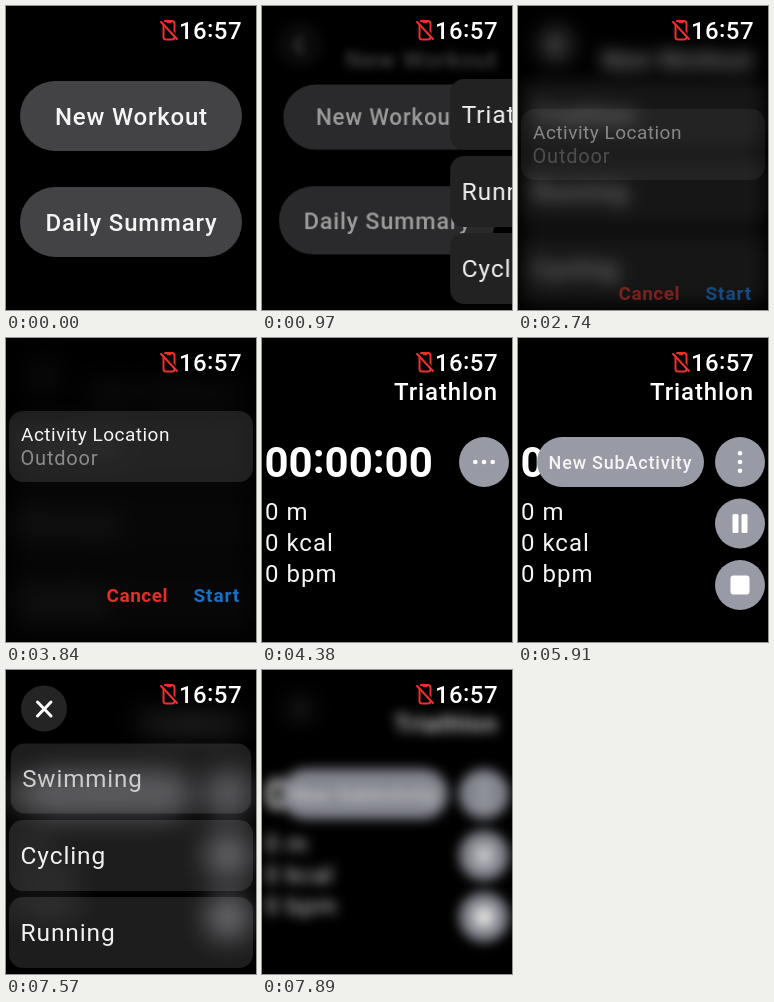
These frames come from a looping animation (250 px wide and 304 px high, 8 s). An HTML page with a canvas:

```html
<!DOCTYPE html>
<html lang="en">
<head>
<meta charset="utf-8">
<title>Workout watch app</title>
<style>
  html, body { margin: 0; width: 100%; height: 100%; overflow: hidden; background: #000; }
  canvas { display: block; width: 250px; height: 304px; }
</style>
</head>
<body>
<canvas id="stage" width="250" height="304"></canvas>
<script>
const W = 250, H = 304, LOOP = 8000;
const stage = document.getElementById('stage').getContext('2d');
const buffer = document.createElement('canvas');
buffer.width = W;
buffer.height = H;
const paint = buffer.getContext('2d');
let g = stage;

const clamp = v => Math.max(0, Math.min(1, v));
const lerp = (a, b, p) => a + (b - a) * p;
const smooth = p => p * p * (3 - 2 * p);
const easeOut = p => 1 - (1 - p) ** 3;

// Progress in n hard steps: the first lands at start, the last at end.
function stepped(t, start, end, n) {
  if (t < start) return 0;
  if (t >= end) return 1;
  return (Math.floor((t - start) / (end - start) * (n - 1) + 0.03) + 1) / n;
}
// Same steps, but the first one still holds the old pose.
const held = (t, start, end, n) => clamp((stepped(t, start, end, n) * n - 1) / (n - 1));

function box(x, y, w, h, r, fill) {
  g.fillStyle = fill;
  g.beginPath();
  g.roundRect(x, y, w, h, r);
  g.fill();
}
function disc(x, y, r, fill) {
  g.fillStyle = fill;
  g.beginPath();
  g.arc(x, y, r, 0, Math.PI * 2);
  g.fill();
}
function line(points, color, width) {
  g.strokeStyle = color;
  g.lineWidth = width;
  g.lineCap = g.lineJoin = 'round';
  g.beginPath();
  points.forEach(([x, y], i) => i ? g.lineTo(x, y) : g.moveTo(x, y));
  g.stroke();
}
function setFont(size, weight, gap) {
  g.font = `${weight} ${size}px Roboto, sans-serif`;
  g.letterSpacing = gap + 'px';
}
function text(str, x, y, { size = 24, weight = 400, gap = 0.9, color = '#f5f5f5', align = 'left' } = {}) {
  setFont(size, weight, gap);
  g.fillStyle = color;
  g.textAlign = align;
  const trail = { left: 0, center: gap / 2, right: gap }[align];
  g.fillText(str, x + trail, y);
}
// Digits with colons raised to their middle.
function clock(str, x, y, size, weight, gap) {
  setFont(size, weight, gap);
  g.fillStyle = '#fff';
  g.textAlign = 'left';
  for (const ch of str) {
    g.fillText(ch, x, ch === ':' ? y - size * 0.09 : y);
    x += g.measureText(ch).width;
  }
}
function scaled(x, y, s, draw) {
  g.save();
  g.translate(x, y);
  g.scale(s, s);
  g.translate(-x, -y);
  draw();
  g.restore();
}

function layer(draw, { blur = 0, alpha = 1, dx = 0, dy = 0, scale = 1 } = {}) {
  if (alpha <= 0) return;
  paint.clearRect(0, 0, W, H);
  g = paint;
  draw();
  g = stage;
  g.save();
  g.globalAlpha = clamp(alpha);
  if (blur > 0.05) g.filter = `blur(${blur}px)`;
  g.translate(W / 2 + dx, H / 2 + dy);
  g.scale(scale, scale);
  g.drawImage(buffer, -W / 2, -H / 2);
  g.restore();
}
// A screen lying behind a sheet; q = 1 when fully covered.
function behind(draw, q, dim, alpha = 1) {
  layer(draw, { blur: 13 * q, alpha: alpha * (1 - dim * q * q) });
}

function status() {
  const red = '#ee3028';
  g.strokeStyle = red;
  g.lineWidth = 2;
  g.beginPath();
  g.roundRect(157.5, 15, 11, 18.5, 2.5);
  g.stroke();
  line([[161.5, 16.5], [164.5, 16.5]], red, 1.5);
  line([[156.5, 15.2], [172, 31.8]], '#000', 2);
  line([[155, 16], [171, 33]], red, 2);
  clock('16:57', 173, 33, 24, 500, 0.4);
}

const title = (str, gap) => text(str, 235, 62, { weight: 500, gap, align: 'right', color: '#fff' });

function home(press) {
  ['New Workout', 'Daily Summary'].forEach((label, i) => {
    const y = 75 + i * 106;
    scaled(125, y + 35, i ? 1 : 1 - 0.04 * press, () => {
      box(14, y, 222, 70, 35, '#434346');
      text(label, 125, y + 43.5, { weight: 500, gap: 0.8, align: 'center' });
    });
  });
}

function rows(names, fill, press = 0) {
  names.forEach((name, i) => {
    const y = 73 + i * 77;
    scaled(125, y + 36, i ? 1 : 1 - 0.015 * press, () => {
      box(3, y, 244, 71, 14, fill);
      const shade = i ? 240 : 240 - 35 * press;
      text(name, 14.5, y + 44, { size: 24.5, color: `rgb(${shade},${shade},${shade})` });
    });
  });
}
const sports = press => rows(['Triathlon', 'Running', 'Cycling'], '#222223', press);
function sportsHeader() {
  disc(38, 38.5, 23, '#242425');
  line([[40.5, 31], [33, 39], [40.5, 47]], '#fff', 3.4);
  title('New Workout', 0.7);
}

const GLASS = 'rgba(255,255,255,0.115)';
function locationSheet(press) {
  box(3, 73, 244, 71, 14, GLASS);
  text('Activity Location', 15, 102.5, { size: 19, gap: 0.5 });
  text('Outdoor', 14.5, 127, { size: 20, gap: 0.8, color: '#8b8b8e' });
  text('Cancel', 100.5, 264, { size: 19, weight: 600, gap: 0.5, color: '#e22f28' });
  text('Start', 187.5, 264, { size: 19, weight: 600, gap: 0.9, color: press ? '#1670c8' : '#1a80e4' });
}

const activities = press => rows(['Swimming', 'Cycling', 'Running'], GLASS, press);
function closeButton() {
  disc(38, 38.5, 23, 'rgba(255,255,255,0.14)');
  line([[31.5, 32], [45, 46]], '#fff', 3);
  line([[45, 32], [31.5, 46]], '#fff', 3);
}

function workout(t) {
  const m = stepped(t, 5700, 5910, 3);
  const grey = '#989aa5';
  const seconds = t < 5330 ? 0 : t < 6350 ? 1 : 2;
  title('Triathlon', 0.9);
  clock('00:00:0' + seconds, 2.5, 138.5, 42, 700, 0);
  ['0 m', '0 kcal', '0 bpm'].forEach((s, i) => text(s, 3, 182 + i * 31, { gap: 1 }));

  if (m > 0) {
    g.save();
    g.globalAlpha = m;
    const mid = lerp(222, 102.5, m), w = lerp(50, 167, m);
    box(mid - w / 2, 99, w, 50, 25, grey);
    scaled(mid, 124, w / 167, () =>
      text('New SubActivity', mid - 0.5, 131, { size: 18, weight: 500, gap: 0.8, align: 'center' }));
    const pause = lerp(124, 185.5, m), stop = lerp(124, 247, m);
    disc(222, stop, 25, grey);
    box(212.5, stop - 9.5, 19, 19, 3, '#fff');
    disc(222, pause, 25, grey);
    box(214.5, pause - 9.5, 6, 19, 1.5, '#fff');
    box(223.5, pause - 9.5, 6, 19, 1.5, '#fff');
    g.restore();
  }
  disc(222, 124, 25, grey);
  for (const k of [-1, 0, 1]) {
    const a = m * Math.PI / 2;
    disc(222 + 8.7 * k * Math.cos(a), 124 + 8.7 * k * Math.sin(a), 2.3, '#fff');
  }
}

function draw(t) {
  g = stage;
  g.fillStyle = '#000';
  g.fillRect(0, 0, W, H);

  if (t < 2410) {
    const p = stepped(t, 860, 1400, 6), e = smooth(p);
    layer(() => home(p > 0 ? 1 : 0), { alpha: 1 - 1.4 * e, scale: 1 - 0.1 * e });
    if (p > 0) {
      layer(() => sports(0), { dx: 250 * (1 - e) });
      layer(sportsHeader, { alpha: e, blur: 6 * (1 - e) });
    }
  } else if (t < 4380) {
    const p = stepped(t, 2410, 3190, 8), out = held(t, 3840, 4380, 6);
    const e = smooth(p), q = clamp(1.3 * e) * (1 - smooth(out));
    behind(() => sports(1 - e), q, 0.77, 1 - 2 * out);
    behind(sportsHeader, q, 0.85, 1 - 2 * out);
    if (out > 0) behind(() => workout(t), q, 0.58, 2 * out - 0.2);
    layer(() => locationSheet(t >= 3840), {
      dy: 240 * (1 - easeOut(p)) + 260 * smooth(out),
      alpha: e * (1 - 1.1 * out)
    });
  } else {
    const p = stepped(t, 6540, 7210, 7), out = held(t, 7570, 7890, 4);
    const e = smooth(p);
    behind(() => workout(t), clamp(1.3 * e) * (1 - 0.53 * out), 0.58);
    if (p > 0) {
      layer(() => activities(t >= 7570 ? 1 : 0), {
        dy: 240 * (1 - easeOut(p)) + 260 * smooth(out),
        alpha: e * (1 - out)
      });
      layer(closeButton, { alpha: e * (1 - 0.85 * out), blur: 6 * (1 - e) + 7 * out });
    }
  }
  status();
}

const begin = performance.now();
function tick() {
  draw((performance.now() - begin) % LOOP);
  requestAnimationFrame(tick);
}
tick();
</script>
</body>
</html>
```
